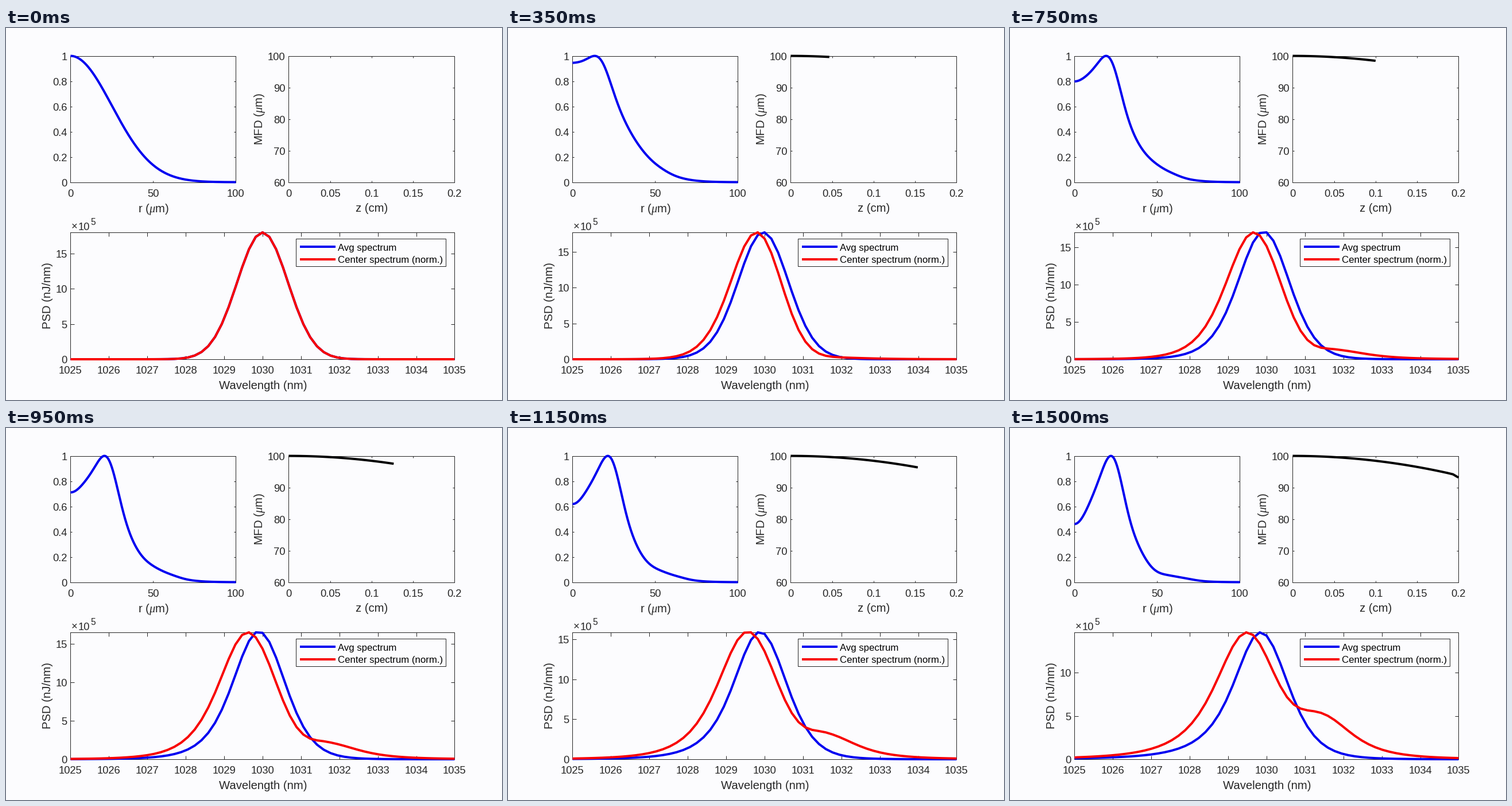
A matplotlib script for the animation above (1550 ms loop, 864 px wide and 648 px high).

```python
import numpy as np
import matplotlib.pyplot as plt
from matplotlib.animation import FuncAnimation
from matplotlib.patches import Rectangle

W, H = 864, 648
FRAMES, INTERVAL = 31, 50
INK, PAPER = "#262626", "#fcfcfe"
BLUE, RED = "#0000f0", "#f80000"
TICK, LABEL, SMALL = 18.4, 20.3, 16.7
TOP, BASE = 356, 577

plt.rcParams.update({
    "font.family": "Liberation Sans",
    "mathtext.fontset": "custom",
    "mathtext.rm": "Liberation Sans",
    "mathtext.it": "Liberation Serif:italic",
    "axes.linewidth": 1,
    "axes.edgecolor": INK,
    "text.color": INK,
})

r = np.linspace(0, 100, 301)
path = np.linspace(0, 1, FRAMES)

# Wavelengths of a uniform frequency grid (20 ps window) around 1030 nm.
C = 299792.458
lam = np.sort(C / (C / 1030 + 0.05 * np.arange(-29, 30)))
shift = lam - 1030
lam = np.clip(lam, 1025, 1035)


def hump(x, center, width):
    return np.exp(-((x - center) / width)**2)


def profile(s):
    """Input Gaussian, hollowed at the centre, with a bright ring and a dark ring."""
    ratio = (1 - 0.55 * s * hump(r, 0, 14)
             + (0.75 * s - 0.2 * s**2) * hump(r, 25 - 15 * (1 - s)**3, 8.5)
             - 0.4 * s**2 * hump(r, 35 + 16 * s, 10)
             + 0.2 * s * hump(r, 52 + 20 * s, 7))
    p = ratio * np.exp(-2 * (r / 50)**2)
    return p / p.max()


def field_diameter(s):
    """Quadratic shrinking with a last sudden drop."""
    return 100 - 6.2 * s**2 - 0.65 * s**90


def flank(d, half, tail):
    """Bell with a given half width; tail 0 is Gaussian, larger has wider wings."""
    m = 1 / max(tail, 0.004)
    return (1 + (2**(1 / m) - 1) * (d / half)**2)**-m


def bell(center, left, left_tail, right, right_tail):
    d = shift - center
    return np.where(d < 0, flank(d, left, left_tail), flank(d, right, right_tail))


def avg_spectrum(s):
    y = bell(-0.155 * s, 0.78 + 0.06 * s**2, 0.48 * s + 0.1 * s**2,
             0.78 + 0.05 * s**2, 0.28 * s)
    return y / y.max()


def center_spectrum(s):
    """Red-shifting main peak plus a growing side bump."""
    main = bell(-0.52 * s**0.65, 0.78 + 0.19 * s**1.3, 0.58 * s,
                0.78 + 0.07 * s - 0.05 * np.sin(2 * np.pi * s), 0)
    height = 0.34 * s**2.3
    y = main + height * bell(2 - 0.58 * s**1.6, 0.5 + 0.9 * height, 0, 0.95, 0.57)
    return y / y.max()


fig = plt.figure(figsize=(W / 72, H / 72), dpi=72, facecolor=PAPER)
page = fig.add_axes([0, 0, 1, 1], zorder=5)
page.set(xlim=(0, W), ylim=(H, 0))
page.axis("off")


def write(x, y, s, size=TICK, ha="center", **kw):
    return page.text(x, y, s, fontsize=size, ha=ha, va="baseline",
                     rotation_mode="anchor", **kw)


def panel(x0, y0, x1, y1, xlim, ylim, xticks, yticks, tick):
    ax = fig.add_axes([x0 / W, 1 - y1 / H, (x1 - x0) / W, (y1 - y0) / H], facecolor=PAPER)
    ax.set(xlim=xlim, ylim=ylim, xticks=xticks, yticks=yticks)
    ax.tick_params(direction="in", top=True, right=True, length=tick, width=1,
                   color=INK, labelbottom=False, labelleft=False)
    for v in xticks:
        write(x0 + (v - xlim[0]) / (xlim[1] - xlim[0]) * (x1 - x0), y1 + 25, f"{v:g}")
    for v in yticks:
        write(x0 - 6, y1 - (v - ylim[0]) / (ylim[1] - ylim[0]) * (y1 - y0) + 7,
              f"{v:g}", ha="right")
    return ax


def curve(ax, color):
    return ax.plot([], [], color=color, lw=4, clip_on=False, zorder=3,
                   solid_capstyle="butt", solid_joinstyle="round")[0]


beam = panel(112.4, 48.6, 400.4, 268.6, (0, 100), (0, 1),
             [0, 50, 100], [0, .2, .4, .6, .8, 1], 3)
size = panel(492.4, 48.6, 781.2, 268.6, (0, .2), (60, 100),
             [0, .05, .1, .15, .2], range(60, 101, 10), 3)
spec = panel(112.4, TOP, 781.4, BASE, (1025, 1035), (0, 1), range(1025, 1036), [0], 6.5)

write(257, 320.5, r"r ($\mu$m)", LABEL)
write(637, 320.5, "z (cm)", LABEL)
write(447.5, 629, "Wavelength (nm)", LABEL)
write(447, 159, r"MFD ($\mu$m)", LABEL, rotation=90)
write(77.5, 466, "PSD (nJ/nm)", LABEL, rotation=90)
write(113.5, 351.5, "×", ha="left")
write(126, 351.5, "10", ha="left")
write(147, 343, "5", 15.5, ha="left")

page.add_patch(Rectangle((505.4, 367.4), 260.5, 47.5, facecolor=PAPER, edgecolor=INK, lw=1))
for y, color, name in [(381, BLUE, "Avg spectrum"), (402.5, RED, "Center spectrum (norm.)")]:
    page.plot([512, 574], [y, y], color=color, lw=4, solid_capstyle="butt")
    write(577.5, y + 7, name, SMALL, ha="left", color="black")

beam_line = curve(beam, BLUE)
size_line = curve(size, "black")
avg_line = curve(spec, BLUE)
center_line = curve(spec, RED)
psd_labels = {v: write(106.5, 0, str(v), ha="right") for v in (5, 10, 15)}


def draw(n):
    s = path[n]
    done = path[:n + 1]
    beam_line.set_data(r, profile(s))
    size_line.set_data(0.2 * done, field_diameter(done))
    avg_line.set_data(lam, avg_spectrum(s))
    center_line.set_data(lam, center_spectrum(s))

    # The spectrum always fills its axis, so the ticks climb as the peak falls.
    peak = 18 - 3.36 * s**1.75
    spec.set_yticks([0] + [v / peak for v in psd_labels if v <= peak])
    for v, text in psd_labels.items():
        text.set_y(BASE - v / peak * (BASE - TOP) + 7)
        text.set_visible(v <= peak)


anim = FuncAnimation(fig, draw, frames=FRAMES, interval=INTERVAL, repeat=True, repeat_delay=0)
plt.show()
```
